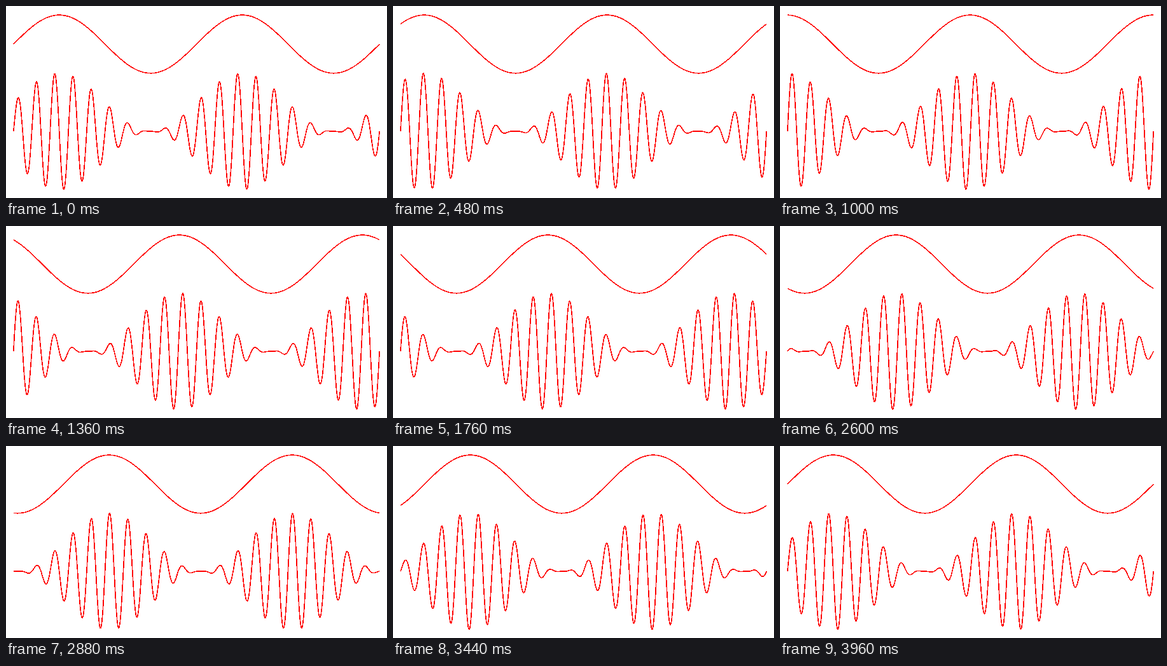
A matplotlib script that plays this animation: 599x302 px, repeating every 4 s.

```python
import numpy as np
import matplotlib.pyplot as plt
from matplotlib.animation import FuncAnimation

W, H, DPI = 599, 302, 100
FRAMES, INTERVAL = 100, 40
LEFT, RIGHT = 11.8, 587.2
SIGNAL_Y, MODULATED_Y = 59.95, 197.2
AMP = 45.76
CARRIER = 10  # carrier cycles per signal cycle
RED = (1, 0, 0)
LINE_PX = 1.6

plt.rcParams["path.simplify"] = False

fig = plt.figure(figsize=(W / DPI, H / DPI), dpi=DPI, facecolor="white")
ax = fig.add_axes([0, 0, 1, 1])
ax.set_xlim(0, W)
ax.set_ylim(H, 0)
ax.axis("off")

t = np.linspace(0, 4 * np.pi, 2400)
x = LEFT + (RIGHT - LEFT) * t / t[-1]


def hard_edges(img, dpi):
    """Turn soft line edges into whole pixels."""
    out = np.empty_like(img)
    out[..., :3] = RED
    out[..., 3] = img[..., 3] > 0.5
    return out, 0, 0


def make_line():
    line, = ax.plot(x, np.zeros_like(x), color=RED, lw=LINE_PX * 72 / DPI,
                    snap=False, solid_capstyle="butt",
                    solid_joinstyle="round")
    line.set_agg_filter(hard_edges)
    return line


signal_line, modulated_line = make_line(), make_line()


def update(i):
    # The last frame closes the cycle on the same phase as the first.
    phase = 2 * np.pi * i / (FRAMES - 1)
    signal = np.sin(t + phase)
    modulated = (1 + signal) * np.sin(CARRIER * t)
    signal_line.set_ydata(SIGNAL_Y - AMP * signal)
    modulated_line.set_ydata(MODULATED_Y - AMP * modulated)
    return signal_line, modulated_line


anim = FuncAnimation(fig, update, frames=FRAMES, init_func=lambda: update(0),
                     interval=INTERVAL, repeat=True, repeat_delay=0, blit=False)
plt.show()
```
